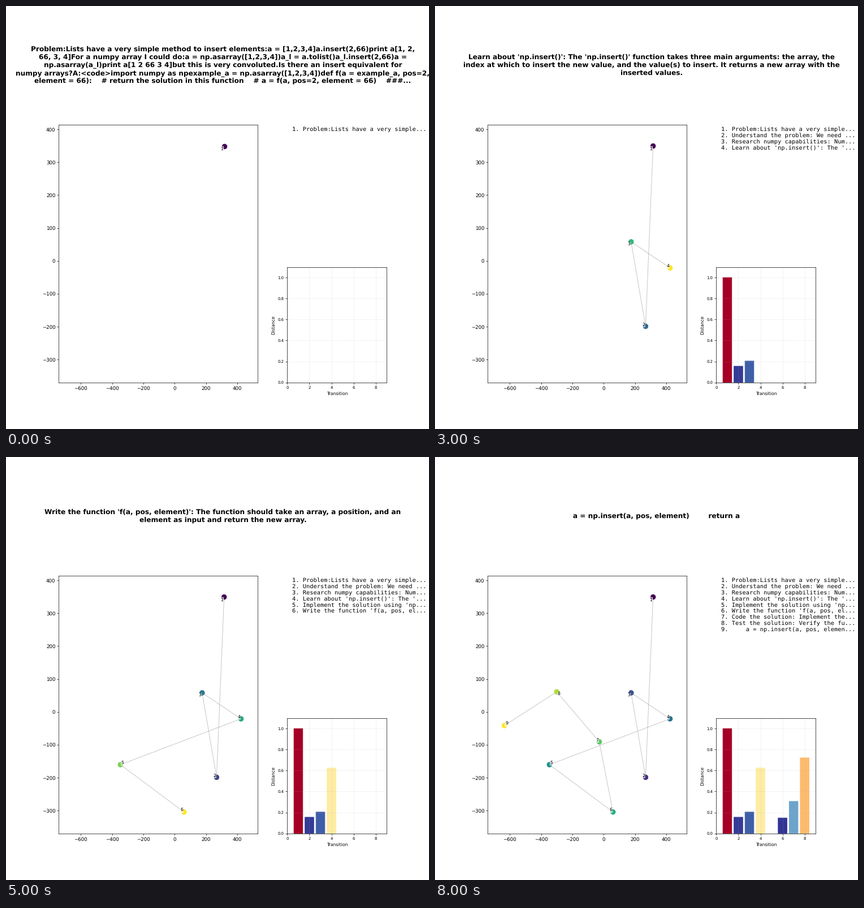
Animation, 748 px wide and 748 px high, one loop 9000 ms. Source, as a matplotlib script:

```python
import numpy as np
import matplotlib.pyplot as plt
from matplotlib.animation import FuncAnimation

SIZE = 748
INCHES = 12

STEPS = [
    "Problem:Lists have a very simple method to insert elements:a = [1,2,3,4]a.insert(2,66)print a[1, 2,\n"
    "66, 3, 4]For a numpy array I could do:a = np.asarray([1,2,3,4])a_l = a.tolist()a_l.insert(2,66)a =\n"
    "np.asarray(a_l)print a[1 2 66 3 4]but this is very convoluted.Is there an insert equivalent for\n"
    "numpy arrays?A:<code>import numpy as npexample_a = np.asarray([1,2,3,4])def f(a = example_a, pos=2,\n"
    "element = 66):    # return the solution in this function    # a = f(a, pos=2, element = 66)    ###...",
    "Understand the problem: We need to insert an element into a numpy array at a specified position,\n"
    "similar to how it's done with Python lists using the 'insert' method. However, numpy arrays don't\n"
    "have an 'insert' method like lists do.",
    "Research numpy capabilities: Numpy provides a function called 'np.insert()' that can be used to\n"
    "insert elements into an array at a specified position.",
    "Learn about 'np.insert()': The 'np.insert()' function takes three main arguments: the array, the\n"
    "index at which to insert the new value, and the value(s) to insert. It returns a new array with the\n"
    "inserted values.",
    "Implement the solution using 'np.insert()': We will use 'np.insert()' to insert the element 66 at\n"
    "position 2 in the array 'a'.",
    "Write the function 'f(a, pos, element)': The function should take an array, a position, and an\n"
    "element as input and return the new array.",
    "Code the solution: Implement the 'f' function using 'np.insert()'. This involves calling\n"
    "'np.insert(a, pos, element)' and returning the result.",
    "Test the solution: Verify the function 'f' works correctly by testing it with the given inputs and\n"
    "checking that the output is as expected.",
    "    a = np.insert(a, pos, element)        return a",
]
POINTS = np.array([
    (316, 349.5), (268, -199), (175.5, 58), (424, -21), (-346.5, -160.5),
    (59.5, -304.5), (-28, -91), (-299.5, 61), (-634.5, -41.5),
])
DISTANCES = np.array([1, 0.155, 0.204, 0.624, 0, 0.148, 0.306, 0.721])

plt.rcParams["text.hinting"] = "none"
fig = plt.figure(figsize=(INCHES, INCHES), dpi=SIZE / INCHES, facecolor="white")


def add_axes(left, top, right, bottom):
    """Axes from pixel edges measured from the top left."""
    return fig.add_axes([left / SIZE, 1 - bottom / SIZE,
                         (right - left) / SIZE, (bottom - top) / SIZE])


def add_text(x, y, **style):
    return fig.text(x / SIZE, 1 - y / SIZE, "", **style)


title = add_text(383.35, 104.3, ha="center", va="center", fontsize=14,
                 weight="bold", linespacing=1.25)
rows = [add_text(506.5, 221 + 10.87 * i, fontsize=12, family="DejaVu Sans Mono")
        for i in range(len(STEPS))]

# Path of the steps
path_ax = add_axes(93.4, 209.6, 444.84, 665.72)
low, high = POINTS.min(axis=0), POINTS.max(axis=0)
pad = 0.1 * (high - low)
center = (low + high) / 2
path_ax.set(xlim=(low[0] - pad[0], high[0] + pad[0]),
            ylim=(low[1] - pad[1], high[1] + pad[1]),
            xticks=range(-600, 401, 200), yticks=range(-300, 401, 100))
path, = path_ax.plot([], [], color="gray", alpha=0.5, lw=1, zorder=1)
dots = path_ax.scatter([], [], s=100, zorder=2)

labels = []
for i, point in enumerate(POINTS):
    labels.append(path_ax.annotate(
        str(i + 1), point, xytext=4.5 * np.sign(center - point),
        textcoords="offset points", ha="center", va="center_baseline",
        fontsize=9, zorder=3,
        bbox=dict(boxstyle="round,pad=0.1", fc="white", ec="none", alpha=0.7)))

# Distance of each transition
bar_ax = add_axes(497.4, 461.6, 673.2, 665.72)
bar_ax.set(xlim=(0, 9), ylim=(0, 1.1), xticks=range(0, 9, 2),
           yticks=np.arange(6) / 5)
bar_ax.set_xlabel("Transition", fontsize=9)
bar_ax.set_ylabel("Distance", fontsize=9)
bar_ax.tick_params(labelsize=8)
bar_ax.grid(True, linestyle="--", alpha=0.3)
scale = plt.Normalize(DISTANCES[DISTANCES > 0].min(), DISTANCES.max(), clip=True)
shades = plt.cm.RdYlBu_r(scale(DISTANCES))
bars = bar_ax.bar(np.arange(1, len(DISTANCES) + 1), DISTANCES, width=0.8,
                  color=shades, edgecolor=shades, linewidth=1, snap=False)


def draw(frame):
    n = frame + 1
    title.set_text(STEPS[frame])
    path.set_data(*POINTS[:n].T)
    dots.set_offsets(POINTS[:n])
    colors = plt.cm.viridis(np.linspace(0, 1, n))
    dots.set_facecolor(colors)
    dots.set_edgecolor(colors)
    for i, (row, label) in enumerate(zip(rows, labels)):
        row.set_text(f"{i + 1}. {STEPS[i][:32]}..." if i < n else "")
        label.set_visible(i < n)
    for i, bar in enumerate(bars):
        bar.set_visible(i < frame and DISTANCES[i] > 0)
    return []


anim = FuncAnimation(fig, draw, frames=len(STEPS), init_func=lambda: draw(0),
                     interval=1000, repeat=True, repeat_delay=0, blit=False)
plt.show()
```
